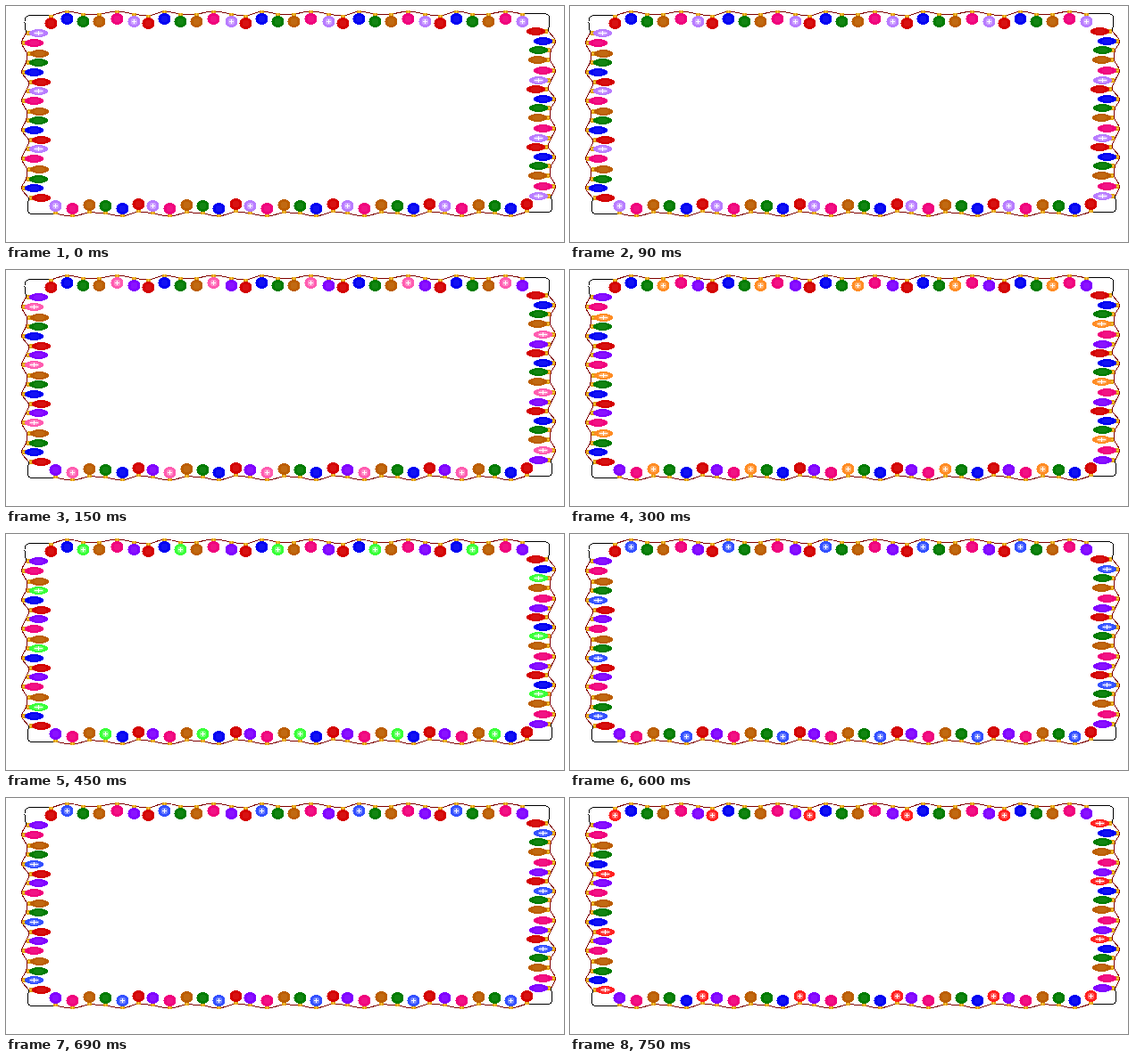
An HTML page for the animation above (900 ms loop, 625x265 px).

```html
<!DOCTYPE html>
<html lang="en">
<head>
<meta charset="utf-8">
<title>Fairy lights</title>
<style>
  html, body { margin: 0; width: 100%; height: 100%; overflow: hidden; background: #fff; }
  svg { display: block; width: 625px; height: 265px; }
</style>
</head>
<body>
<svg id="stage" viewBox="0 0 625 265" shape-rendering="crispEdges"></svg>
<script>
const STEP = 150;
const NS = 'http://www.w3.org/2000/svg';
const stage = document.getElementById('stage');

// In twinkling order; the garland strings them the other way round
const HUES = [
  { off: '#8000ff', on: '#b87cff' },
  { off: '#f0007c', on: '#ff5cb0' },
  { off: '#bc5e00', on: '#ff8c24' },
  { off: '#007c00', on: '#38ff38' },
  { off: '#0000f2', on: '#3350ff' },
  { off: '#d40000', on: '#ff2020' }
];
const COUNT = HUES.length;

// How far each bulb of a run hangs inwards
const SAG = [8, 0, 5, 6, 0, 5];

// Bulb shapes: half width, half length, spacing, share of the sag, runs per side
const ROUND = { rx: 7, ry: 6.5, pitch: 18.15, sag: 0.57, runs: 5 };
const LONG = { rx: 4.5, ry: 10.5, pitch: 10.84, sag: 1, runs: 3 };

// Clockwise from the top; each side starts with a red bulb
const SIDES = [
  { x: 50.5, y: 14.5, kind: ROUND },
  { x: 601.5, y: 28.2, kind: LONG },
  { x: 583.8, y: 227.2, kind: ROUND },
  { x: 31.2, y: 215.7, kind: LONG }
];

function add(parent, tag, attrs) {
  const el = document.createElementNS(NS, tag);
  for (const k in attrs) el.setAttribute(k, attrs[k]);
  parent.appendChild(el);
  return el;
}

// Smooth curve through a list of points
function curve(pts) {
  let d = `M${pts[0]}`;
  for (let i = 0; i < pts.length - 1; i++) {
    const p = pts[Math.max(i - 1, 0)], a = pts[i], b = pts[i + 1];
    const q = pts[Math.min(i + 2, pts.length - 1)];
    const c1 = [a[0] + (b[0] - p[0]) / 6, a[1] + (b[1] - p[1]) / 6];
    const c2 = [b[0] - (q[0] - a[0]) / 6, b[1] - (q[1] - a[1]) / 6];
    d += `C${c1} ${c2} ${b}`;
  }
  return d;
}

const wires = add(stage, 'g', { fill: 'none', stroke: '#800000' });
const corners = add(stage, 'g', { fill: 'none', stroke: '#000' });
const lamps = add(stage, 'g', {});
const bulbs = HUES.map(() => []);

function addBulb(x, y, turn, { rx, ry }, hue) {
  const g = add(lamps, 'g', { transform: `translate(${x} ${y}) rotate(${turn})` });
  add(g, 'rect', { x: -2.5, y: -ry - 3, width: 5, height: 4, fill: '#e0a010' });
  add(g, 'rect', { x: -0.5, y: -ry - 3, width: 1, height: 3, fill: '#ffc840' });
  const body = add(g, 'ellipse', { rx, ry });
  const core = add(g, 'ellipse', { rx: rx * 0.55, ry: ry * 0.55, fill: '#fff' });
  const arm = ry * 0.35 + 0.5;
  const star = add(g, 'path', { d: `M0 ${-arm}V${arm}M-2.5 0H2.5`, stroke: '#fff' });
  bulbs[hue].push({ body, core, star });
}

const lines = SIDES.map(({ x, y, kind }, side) => {
  const turn = side * 90;
  const ux = Math.round(Math.cos(turn * Math.PI / 180));
  const uy = Math.round(Math.sin(turn * Math.PI / 180));
  const reach = kind.ry + (kind === LONG ? 3.5 : 2);
  const line = [];
  for (let n = 0; n < kind.runs * COUNT; n++) {
    const i = n % COUNT;
    // The last two bulbs of a run sit a little further on
    const along = kind.pitch * (n + Math.max(0, i - 3) * 0.055);
    const depth = SAG[i] * kind.sag;
    const px = Math.floor(x + ux * along - uy * depth) + 0.5;
    const py = Math.floor(y + uy * along + ux * depth) + 0.5;
    line.push([px + uy * reach, py - ux * reach]);
    addBulb(px, py, turn, kind, COUNT - 1 - i);
  }
  add(wires, 'path', { d: curve(line) });
  return line;
});

// Rounded black wire from the end of one side to the start of the next
lines.forEach((line, side) => {
  const a = line[line.length - 1];
  const b = lines[(side + 1) % lines.length][0];
  const level = side % 2 === 0;
  const [x, y] = level ? [b[0], a[1]] : [a[0], b[1]];
  const c = [x + (x > 300 ? 2.5 : -2.5), y + (y > 130 ? 1 : -0.5)];
  const near = p => {
    const k = 8 / Math.hypot(p[0] - c[0], p[1] - c[1]);
    return [c[0] + (p[0] - c[0]) * k, c[1] + (p[1] - c[1]) * k];
  };
  add(corners, 'path', { d: `M${a}L${near(a)}Q${c} ${near(b)}L${b}` });
});

let shown = -1;
function render(t) {
  const lit = Math.floor(t / STEP) % COUNT;
  if (lit === shown) return;
  shown = lit;
  HUES.forEach((hue, i) => {
    const on = i === lit;
    for (const { body, core, star } of bulbs[i]) {
      body.setAttribute('fill', on ? hue.on : hue.off);
      core.setAttribute('opacity', on ? 0.3 : 0.07);
      star.setAttribute('visibility', on ? 'visible' : 'hidden');
    }
  });
}

const start = performance.now();
function tick() {
  render(performance.now() - start);
  requestAnimationFrame(tick);
}
tick();
</script>
</body>
</html>
```
